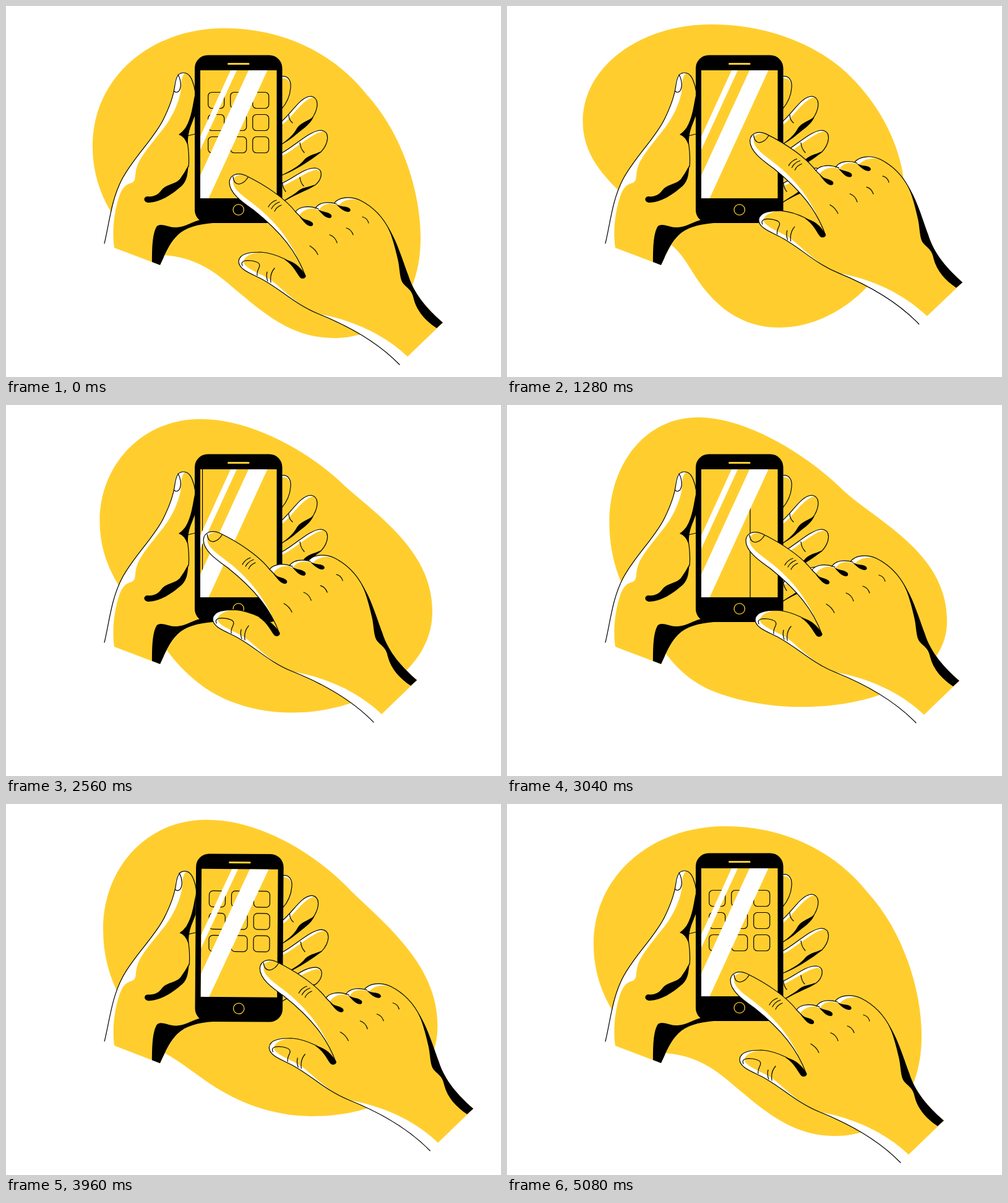
Recreate the animation shown at these times as an HTML page. Size 800 by 600 pixels, loop 5.12 s.

```html
<!DOCTYPE html>
<html lang="en">
<head>
<meta charset="utf-8">
<title>Phone in hands</title>
<style>
  html, body { margin: 0; width: 100%; height: 100%; overflow: hidden; background: #fff; }
  svg { display: block; width: 100vw; height: 100vh; }
  .y { fill: #ffce2e; }
  .w { fill: #fff; }
  .l { fill: none; stroke: #000; stroke-width: 1.2; stroke-linecap: round; stroke-linejoin: round; }
</style>
</head>
<body>
<svg viewBox="0 0 800 600">
  <defs>
    <clipPath id="glass"><rect x="314" y="104" width="123.500" height="207"/></clipPath>
  </defs>
  <path id="blob" class="y"/>

  <g id="holder">
    <!-- fingers behind the phone -->
    <g id="fingers"></g>
    <path d="M497 179C488 186 475 189 470 198C464 209 456 215 445 224C459 217 466 210 476 202C487 194 494 187 497 179Z
      M509 235C497 241 487 241 480 251C472 260 458 267 445 274C459 269 471 262 481 255C492 247 501 244 509 235Z
      M499 289C489 293 478 293 471 300C464 306 455 310 445 318C457 311 465 307 476 301C485 298 493 295 499 289Z"/>
    <path class="l" d="M457 176Q457 184 463 189M475 221Q476 231 482 237M475 277Q476 286 481 291M447 286Q447 294 452 300"/>

    <!-- palm and thumb -->
    <path class="w" d="M159 384C167 351 170 314 187 281C205 246 238 216 254 184C266 160 271 144 273 128C275 112 280 108 287 108C297 108 301 119 304 130L320 140L330 350C285 355 270 372 249 419L175 391Z"/>
    <path class="y" d="M175 391C171 364 175 335 181 314C185 300 190 290 200 287C212 284 207 276 211 262C215 245 240 217 256 196C270 177 278 158 282 140C284 126 282 115 289 109C298 110 301 119 304 130L320 140L330 350C285 355 270 372 249 419Z"/>
    <path class="w" d="M278 111C271 118 272 131 272 138Q275 141 279 139C284 133 282 119 278 111Z"/>
    <path class="l" d="M159 384C167 351 170 314 187 281C205 246 238 216 254 184C266 160 271 144 273 128C275 112 280 108 287 108C297 108 301 119 304 130L306 140M278 111C283 120 284 132 279 138Q275 141 272 138M295 260C297 240 294 225 292 212M293 210L306 207"/>
    <path d="M305 145C302 158 300 181 290 197Q285 204 279 208Q288 210 294 226Q293 210 298 196L305 178Z
      M228 308C239 309 246 305 251 298C258 288 273 289 281 280Q289 269 295 257C293 270 294 281 284 291C270 303 252 317 231 318C222 318 221 309 228 308Z
      M236 414C236 396 236 367 244 356C252 350 263 359 276 358C292 357 301 348 317 345L334 346L334 351C310 353 290 358 277 371C263 385 257 402 249 419Z"/>

    <!-- phone -->
    <rect x="305" y="79.500" width="141.500" height="271.500" rx="21"/>
    <rect class="y" x="314" y="104" width="123.500" height="207"/>
    <rect class="y" x="358" y="92" width="35.500" height="3" rx="1.500"/>
    <circle cx="375.700" cy="329.500" r="8.700" fill="none" stroke="#ffce2e" stroke-width="1.300"/>
    <g clip-path="url(#glass)">
      <g id="icons" class="l"></g>
      <path id="edge" class="l" d="M0 104V311"/>
      <path class="w" d="M363 104H373L314 232.500V211ZM392 104H422.500L327.500 311H314V274Z"/>
    </g>
  </g>

  <g id="pointer">
    <path class="w" d="M636 580C600 543 555 518 505 498C465 482 440 454 408 439C392 431 376 425 376 413C377 399 398 398 412 398C435 400 468 413 484 437C470 398 445 366 400 330C380 316 361 302 361 285C362 272 375 269 387 274C420 290 452 312 468 333C472 326 486 321 500 327C506 317 521 316 532 319C538 309 556 307 572 314C596 326 612 346 621 365C634 390 644 420 652 442C664 472 684 493 706 512Z"/>
    <path class="y" d="M649 567L706 512C684 493 664 472 652 442C644 420 634 390 621 365C612 346 596 326 572 314C558 310 545 314 538 322L530 321C520 318 508 323 506 331L500 328C490 326 478 331 474 339L468 333C452 312 420 290 387 274C377 271 367 275 367 285C368 300 390 311 412 330C452 365 470 400 484 437C468 413 435 400 412 398C398 399 384 405 384 414C385 424 410 432 428 443C452 462 475 487 505 498C560 508 610 530 649 567Z"/>
    <path class="l" d="M636 580C600 543 555 518 505 498C465 482 440 454 408 439C392 431 376 425 376 413C377 399 398 398 412 398C435 400 468 413 484 437C470 398 445 366 400 330C380 316 361 302 361 285C362 272 375 269 387 274C420 290 452 312 468 333L482 347M468 333C472 326 486 321 505 328M500 327C506 317 521 316 534 320M530 319C538 309 556 307 572 314C596 326 612 346 621 365"/>
    <path d="M616 356C630 374 642 414 650 435C660 467 682 491 706 512L696 521C679 510 664 494 659 474C656 457 646 456 640 446C636 438 636 420 633 409C628 388 624 372 616 356Z
      M450 410C470 414 478 426 484 435C486 440 479 443 475 439C468 430 465 420 450 410Z
      M474 340C483 347 489 345 495 350Q498 354 494 356C487 357 481 349 474 340Z
      M503 328C512 334 519 332 525 337Q528 341 524 343C515 343 511 336 503 328Z
      M533 320C542 326 549 323 555 327Q559 331 554 333C546 333 540 327 533 320Z"/>
    <path class="l" d="M367 276Q368 288 377 288Q386 286 391 277
      M382 420C378 411 390 411 397 412C407 414 412 416 409 423Q405 431 406 436
      M422 430Q420 438 423 445M434 424Q426 433 428 447
      M424 325Q428 317 437 314M429 328Q433 320 442 317M434 332Q437 325 445 322
      M576 341Q584 343 586 351M550 359Q558 361 561 370M523 370Q532 373 535 383M491 388Q500 393 504 402"/>
  </g>
</svg>
<script>
const LOOP = 5120, STEP = 40;
const $ = id => document.getElementById(id);
const ease = u => u * u * (3 - 2 * u);

// Finger: outline, then the lit part inside it
const fingers = [
  ["M445 114C456 112 461 121 460 132C459 145 453 158 445 167", "M445 117C454 116 458 120 460 130C459 145 453 158 445 167"],
  ["M445 187C462 173 476 146 493 146C506 148 505 164 497 178C485 196 464 211 445 224", "M445 193C463 180 479 151 496 148C506 150 505 164 497 178C485 196 464 211 445 224"],
  ["M445 238C467 227 489 202 509 201C525 203 521 223 509 236C491 250 470 264 445 274", "M445 243C468 232 491 208 511 203C524 204 521 223 509 236C491 250 470 264 445 274"],
  ["M445 287C465 279 480 262 500 262C514 264 511 281 499 290C482 300 460 307 445 318", "M445 292C465 284 484 268 501 265C513 266 511 281 499 290C482 300 460 307 445 318"]
];
$("fingers").innerHTML = fingers.map(([outer, inner]) =>
  `<path class="w" d="${outer}Z"/><path class="y" d="${inner}Z"/><path class="l" d="${outer}"/>`).join("");

let icons = "";
for (let i = 0; i < 9; i++)
  icons += `<rect x="${326.7 + i % 3 * 36}" y="${139.5 + (i / 3 | 0) * 36}" width="26" height="26" rx="6"/>`;
$("icons").innerHTML = icons;

// Start point, then seven cubic segments
const shapes = [
  "352 36 470 36 545 95 582 142 640 205 670 300 670 375 670 480 610 537 530 537 460 537 415 495 370 458 330 422 300 407 258 403 205 395 140 320 140 228 140 110 240 36 352 36",
  "327 29 410 29 490 55 545 104 600 155 639 225 640 300 640 410 539 518 429 518 365 518 325 480 300 440 283 410 280 400 267 385 225 310 120.5 275 120.5 182 120.5 95 215 29 327 29",
  "309 20 390 20 490 85 545 140 600 190 712 240 712 350 712 440 600 488 475 488 410 488 350 472 320 457 290 442 270 420 258 404 218 345 166 290 166 190 166 100 220 20 309 20"
].map(s => s.split(" ").map(Number));

const morph = [[0, 0], [1600, 1], [3140, 2], [3200, 2], [LOOP, 0]]
  .map(([t, i]) => [t, ...shapes[i]]);

// time, x, y, angle
const reach = [
  [0, 0, 0, 0], [840, 48, -62, 1.6], [920, 48, -62, 1.6], [1440, 25, -66, 0],
  [1820, 25, -66, 0], [2080, -45, -67, 0], [2320, 25, -66, 0], [2595, -45, -67, 0],
  [2700, -45, -67, 0], [2980, 25, -66, 0], [3080, 25, -66, 0], [3380, -45, -67, 0],
  [3490, -45, -67, 0], [3820, 64, -25, 0], [4270, 0, 0, 0], [LOOP, 0, 0, 0]
];
const sway = [[0, 0], [3560, 0], [3960, 0.4], [4360, 0], [LOOP, 0]];

function at(keys, t) {
  const i = keys.findIndex(k => k[0] > t), a = keys[i - 1], b = keys[i];
  const p = ease((t - a[0]) / (b[0] - a[0]));
  return a.slice(1).map((v, j) => v + (b[j + 1] - v) * p);
}

function draw(t) {
  const [x0, y0, ...curve] = at(morph, t);
  $("blob").setAttribute("d", `M${x0} ${y0}C${curve.join(" ")}Z`);

  const [x, y, angle] = at(reach, t);
  $("pointer").setAttribute("transform", `translate(${x} ${y}) rotate(${angle} 706 512)`);
  $("holder").setAttribute("transform", `rotate(${at(sway, t)[0]} 200 405)`);

  // The page edge is dragged along by the finger
  const swipe = (25 - x) / 70;
  $("edge").setAttribute("transform", `translate(${393 - 79 * swipe} 0)`);
  $("edge").style.display = t >= 1480 && t < 3480 ? "" : "none";
  $("icons").style.display = t >= 920 && t < 3640 ? "none" : "";
}

const start = performance.now();
function tick() {
  const t = (performance.now() - start) % LOOP;
  draw(Math.floor(t / STEP) * STEP);
  requestAnimationFrame(tick);
}
tick();
</script>
</body>
</html>
```
